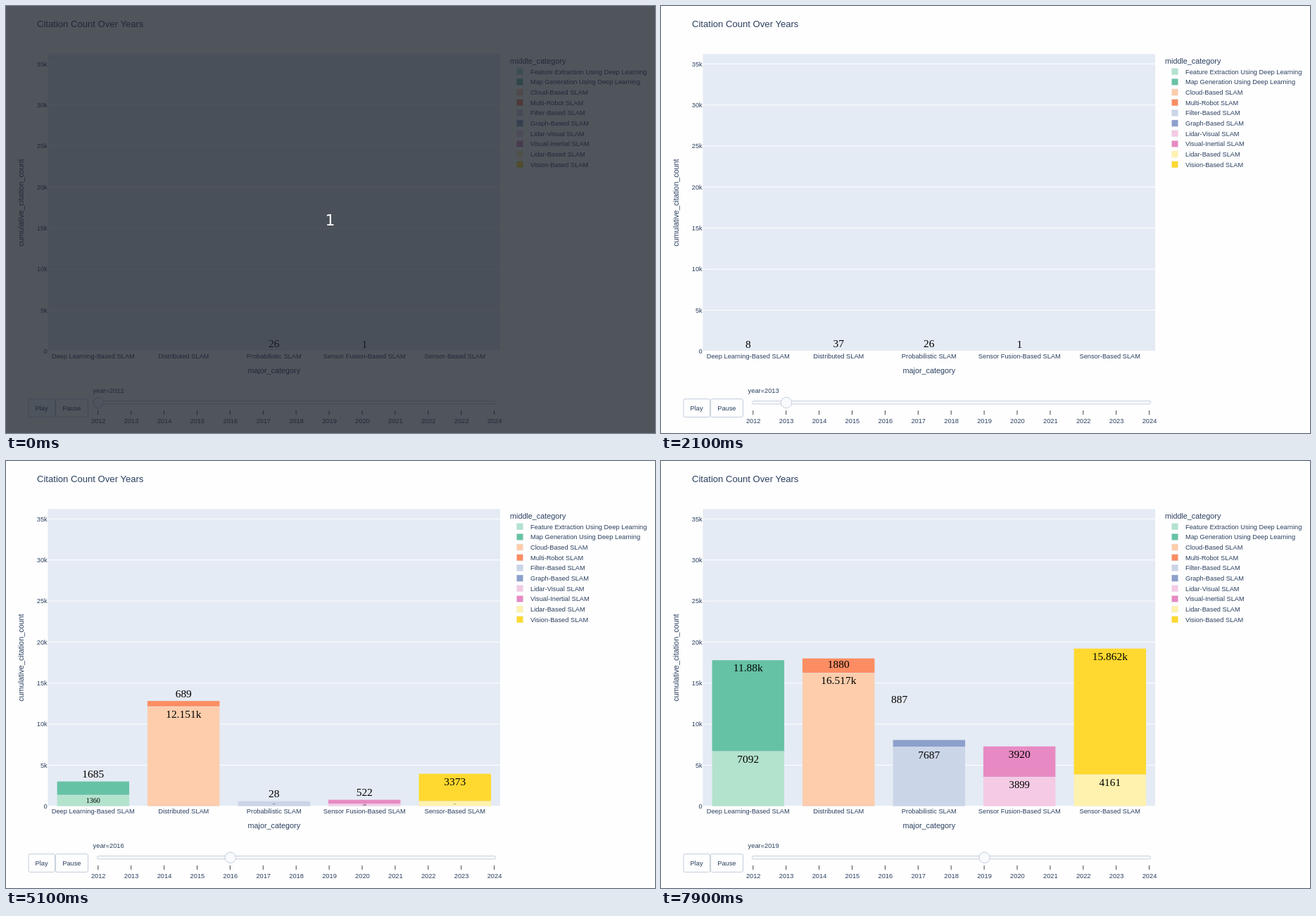
Write an HTML page that moves like this. It is 922 by 607 pixels and loops after 8000 ms.

```html
<!DOCTYPE html>
<html lang="en">
<head>
<meta charset="utf-8">
<title>Citation Count Over Years</title>
<style>
  html, body { margin: 0; width: 100%; height: 100%; overflow: hidden; background: #fefefe; }
  svg { display: block; width: 922px; height: 607px; }
  text { font-family: "Liberation Sans", Arial, sans-serif; fill: #2a3f5f; white-space: pre; }
  .num { font-family: "Liberation Serif", "Times New Roman", serif; font-size: 15.45px; fill: #000; text-anchor: middle; }
  .count { font-family: "DejaVu Sans", sans-serif; font-size: 22px; fill: #fff; text-anchor: middle; }
</style>
</head>
<body>
<svg id="stage" viewBox="0 0 922 607"></svg>
<script>
const LOOP = 8000, FRAME = 100;
const LEFT = 59.5, RIGHT = 702, TOP = 68.3, BASE = 490.8;
const PER_UNIT = 0.011669, COL = (RIGHT - LEFT) / 5, BAR = COL * 0.8;
const SMALL = 9.27, MEDIUM = 10.82, LARGE = 13.1, NUM = 15.45;
const MOVE = 500, SETTLE = 540, SLIDE = 137;

const columns = ["Deep Learning-Based SLAM", "Distributed SLAM", "Probabilistic SLAM",
  "Sensor Fusion-Based SLAM", "Sensor-Based SLAM"];
const series = [
  ["Feature Extraction Using Deep Learning", "#b3e2cd"],
  ["Map Generation Using Deep Learning", "#66c2a5"],
  ["Cloud-Based SLAM", "#fdcdac"],
  ["Multi-Robot SLAM", "#fc8d62"],
  ["Filter-Based SLAM", "#cbd5e8"],
  ["Graph-Based SLAM", "#8da0cb"],
  ["Lidar-Visual SLAM", "#f4cae4"],
  ["Visual-Inertial SLAM", "#e78ac3"],
  ["Lidar-Based SLAM", "#fff2ae"],
  ["Vision-Based SLAM", "#ffd92f"]
];

// One row per year from 2012: start time, then the ten series values.
const years = [
  [590, 0, 0, 0, 0, 26, 0, 1, 0, 0, 0],
  [1471, 8, 0, 37, 0, 26, 0, 1, 0, 0, 0],
  [2481, 12, 0, 40, 0, 90, 0, 1, 0, 0, 0],
  [3518, 421, 310, 11666, 214, 254, 26, 120, 201, 221, 1042],
  [4495, 1360, 1685, 12151, 689, 640, 28, 290, 522, 605, 3373],
  [5540, 2367, 3246, 13588, 906, 1716, 41, 1017, 1064, 1003, 9231],
  [6549, 3955, 6147, 14423, 1181, 4165, 809, 1328, 2567, 1765, 12241],
  [7560, 7092, 11880, 16517, 1880, 7687, 887, 3899, 3920, 4161, 15862]
];

const svg = document.getElementById("stage");

function add(parent, tag, attrs, content) {
  const el = document.createElementNS("http://www.w3.org/2000/svg", tag);
  for (const key in attrs) el.setAttribute(key, attrs[key]);
  if (content !== undefined) el.textContent = content;
  parent.appendChild(el);
  return el;
}
const box = (parent, x, y, width, height, attrs) =>
  add(parent, "rect", { x, y, width, height, ...attrs });

// Label centred vertically on its capitals.
const label = (str, x, cy, size, anchor = "start", extra = {}) =>
  add(svg, "text", { x, y: cy + size * 0.358, "font-size": size, "text-anchor": anchor, ...extra }, str);

const ease = u => u < 0.5 ? 4 * u ** 3 : 1 - 4 * (1 - u) ** 3;
const mix = (a, b, p) => a + (b - a) * p;
const clamp = u => Math.max(0, Math.min(1, u));
const yOf = v => BASE - v * PER_UNIT;
const colX = c => LEFT + COL * (c + 0.5);
const tickX = i => 131.2 + 46.9 * i;
const format = v => v < 10000 ? String(v) : v / 1000 + "k";

// Plot area
label("Citation Count Over Years", 44, 25, LARGE);
const clip = add(add(svg, "defs", {}), "clipPath", { id: "plot" });
box(clip, LEFT, TOP, RIGHT - LEFT, BASE - TOP + 0.4);
box(svg, LEFT, TOP, RIGHT - LEFT, BASE - TOP, { fill: "#e4ebf4" });
for (let i = 0; i < 8; i++) {
  const y = yOf(i * 5000);
  add(svg, "path", { d: `M${LEFT} ${y}H${RIGHT}`, stroke: "#fff", "stroke-width": i ? 1 : 1.5 });
  label(i ? i * 5 + "k" : "0", 58.7, y, SMALL, "end");
}
columns.forEach((name, c) => label(name, colX(c), 498, SMALL, "middle"));
label("major_category", 380.8, 518.3, MEDIUM, "middle");
label("cumulative_citation_count", 0, 0, MEDIUM, "middle", { transform: "translate(21 279.6) rotate(-90)" });

const plot = add(svg, "g", { "clip-path": "url(#plot)" });
const marks = series.map(([, fill]) => ({
  bar: box(plot, 0, 0, BAR, 0, { fill, stroke: "#e5ecf6", "stroke-width": 0.4 }),
  text: add(plot, "text", { class: "num" })
}));

// Legend
label("middle_category", 716, 78, MEDIUM);
series.forEach(([name, fill], i) => {
  const y = 93.2 + i * 14.67;
  box(svg, 725.4, y - 4.6, 9.3, 9.3, { fill, stroke: "#e5ecf6", "stroke-width": 0.4 });
  label(name, 745, y, SMALL);
});

// Buttons and slider
const edge = { fill: "#fefefe", stroke: "#bec8d9", "stroke-width": 0.9 };
const play = box(svg, 32, 558.6, 37.6, 25.8, { ...edge, rx: 2.2 });
box(svg, 70.6, 558.6, 45.9, 25.8, { ...edge, rx: 2.2 });
label("Play", 50.6, 571.5, SMALL, "middle");
label("Pause", 93.4, 571.5, SMALL, "middle");
const yearText = label("", 123.6, 546.8, SMALL);
box(svg, 129.6, 561.6, 566, 4.2, { ...edge, rx: 1.6 });
for (let i = 0; i < 13; i++) {
  add(svg, "path", { d: `M${tickX(i) - 0.4} 575V581`, stroke: "#333", "stroke-width": 0.9 });
  label(2012 + i, tickX(i), 590, SMALL, "middle");
}
const grip = add(svg, "circle", { ...edge, cy: 563.8, r: 7.7, fill: "#f8fafc" });

// Toolbar, cut off by the top edge
const bar = add(svg, "g", { fill: "#444", stroke: "none" });
const icon = (d, opacity = 0.3) => add(bar, "path", { d, opacity });
icon("M722 0H735V5H722ZM726 0V2H731V0Z");
icon("M748 0H756L760 4.5L758.5 6L754 2Q751 4 748 2Z", 0.7);
icon("M771 0H773V2H775L772 5.5L769 2H771ZM766 0H768V1H766ZM776 0H778V1H776Z");
icon("M784 4H787V5.5H784ZM789 4H792V5.5H789ZM794 4H797V5.5H794Z");
icon("M804 0H815Q813 3 808 3L806 6L805 5L806 3Q804 2 804 0Z");
icon("M828 0H839V5H828Z");
icon("M847 0H858V5H847Z");
icon("M869 0H873L877 5H874L871 2L868 5H865Z");
icon("M884 0H894V5H890V1H888V5H884Z");
box(bar, 908.5, 0, 11.5, 5.8, { fill: "#444", opacity: 0.7 });

// Countdown veil
const veil = add(svg, "g", {});
box(veil, 0, 0, 922, 607, { fill: "rgb(28,34,44)", opacity: 0.77 });
add(veil, "text", { class: "count", x: 460.5, y: 312 }, "1");

// Bar and label geometry of series s in year k
function spot(k, s, settled) {
  const row = years[k].slice(1);
  const upper = s % 2, value = row[s];
  const low = upper ? row[s - 1] : 0;
  const top = yOf(low + value), h = value * PER_UNIT;
  const outmost = upper || !row[s + 1];
  const fit = h > 4.5 ? (h - 4.5) / 17.4 : h / 17.4;
  const at = { value, top, bottom: yOf(low), cy: top + 11, scale: 1, fits: fit >= 1 };
  if (!at.fits) {
    if (outmost || !settled) at.cy = top - 10.3;
    else { at.cy = top + h / 2; at.scale = fit; }
  }
  return at;
}

function drawMark(s, k, p, settled) {
  const { bar, text } = marks[s];
  const x = colX(s >> 1);
  const from = spot(Math.max(0, k - 1), s, true), to = spot(k, s, settled);
  const top = mix(from.top, to.top, p), bottom = mix(from.bottom, to.bottom, p);
  bar.setAttribute("x", x - BAR / 2);
  bar.setAttribute("y", top);
  bar.setAttribute("height", Math.max(0, bottom - top));
  bar.setAttribute("visibility", bottom - top > 0.7 ? "visible" : "hidden");

  // Labels outside their bar fly in from the plot corner, the others slide.
  const glide = to.fits && from.value > 0;
  const base = at => at.cy + NUM * 0.3375 * at.scale;
  const tx = glide ? x : mix(LEFT, x, p);
  const ty = mix(glide ? base(from) : TOP, base(to), p);
  const scale = mix(glide ? from.scale : 1, to.scale, p);
  text.textContent = to.value ? format(to.value) : "";
  text.setAttribute("transform", `translate(${tx} ${ty}) scale(${scale})`);
}

function toolbarOpacity(t) {
  if (t < 100) return 0;
  return t < 900 ? clamp(0.5 + (t - 100) / 600) : clamp(1 - (t - 800) / 400);
}

function draw(t) {
  let k = 0;
  while (k + 1 < years.length && years[k + 1][0] <= t) k++;
  const dt = t - years[k][0];
  const idle = dt < 0;
  const settled = idle || dt >= SETTLE;
  const p = idle ? 1 : ease(clamp(dt / MOVE));
  series.forEach((_, s) => drawMark(s, k, p, settled));

  const slide = ease(clamp(dt / SLIDE));
  grip.setAttribute("cx", mix(tickX(Math.max(0, k - 1)), tickX(k), slide));
  yearText.textContent = "year=" + (2012 + k);
  play.setAttribute("fill", t < 900 ? "#f4faff" : "#fefefe");
  bar.setAttribute("opacity", toolbarOpacity(t));
  veil.setAttribute("visibility", t < 100 ? "visible" : "hidden");
}

const begin = performance.now();
function tick() {
  const t = (performance.now() - begin) % LOOP;
  draw(Math.floor(t / FRAME) * FRAME);
  requestAnimationFrame(tick);
}
tick();
</script>
</body>
</html>
```
